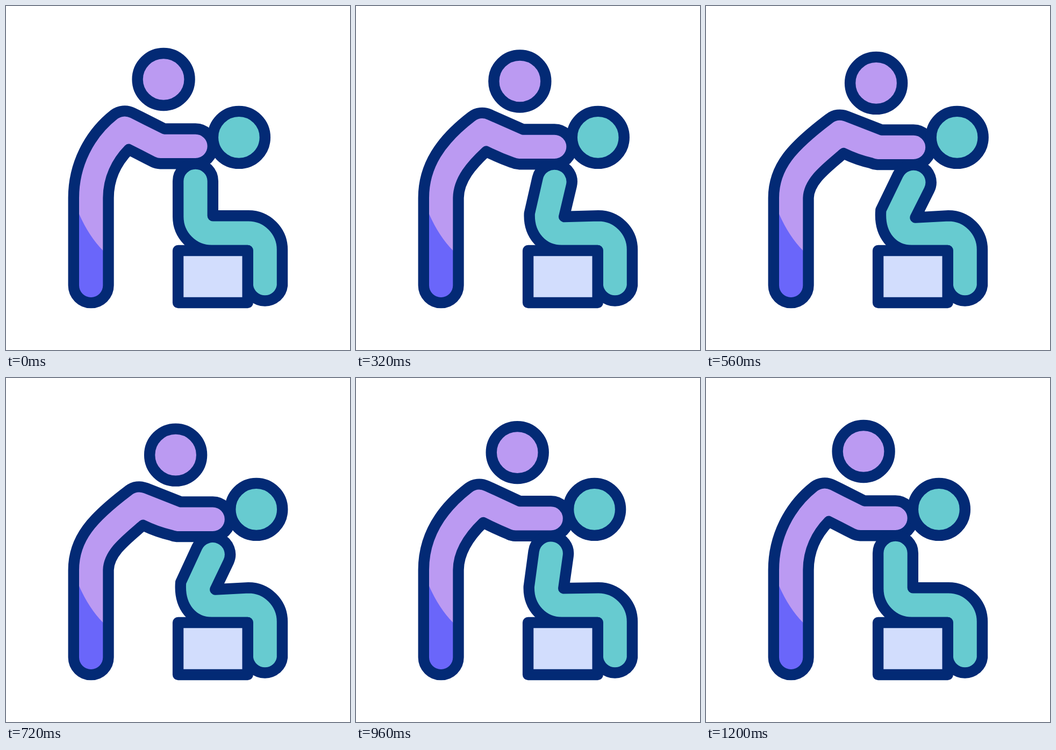
An HTML page that plays this animation: 640x640 px, repeating every 1240 ms.

```html
<!DOCTYPE html>
<html lang="en">
<head>
<meta charset="utf-8">
<title>Massage</title>
<style>
  html, body { margin: 0; width: 100%; height: 100%; overflow: hidden; background: #fff; }
  svg { display: block; width: 100vw; height: 100vh; }
  .line { stroke: #032a75; stroke-width: 20.4; stroke-linejoin: round; stroke-linecap: round; }
</style>
</head>
<body>
<svg viewBox="0 0 640 640">
  <path id="standFill" fill="#bb9af2"/>
  <path fill="#6a66fa" d="M125.8 362L136 387Q154 428 180.4 455L190.5 464V519.8A32.35 32.35 0 0 1 125.8 519.8Z"/>
  <path id="standLine" class="line" fill="none"/>
  <path id="sit" class="line" fill="#67cbd0"/>
  <rect class="line" x="320.1" y="455" width="129.6" height="97" fill="#d2ddfd"/>
  <circle id="standHead" class="line" r="48.5" fill="#bb9af2"/>
  <circle id="sitHead" class="line" r="48.5" fill="#67cbd0"/>
</svg>
<script>
const LOOP = 1240, STEP = 40, START = 28, PEAK = 616, END = 1184;
const el = id => document.getElementById(id);
const clamp = x => Math.min(1, Math.max(0, x));

// cubic-bezier(.5, 0, .5, 1)
function ease(x) {
  let lo = 0, hi = 1;
  for (let i = 0; i < 24; i++) {
    const s = (lo + hi) / 2;
    if (1.5 * s * (1 - s) + s * s * s < x) lo = s; else hi = s;
  }
  return lo * lo * (3 - 2 * lo);
}

function lean(t) {
  return t < PEAK
    ? ease(clamp((t - START) / (PEAK - START)))
    : ease(clamp((END - t) / (END - PEAK)));
}

const pair = (x, y) => `${x.toFixed(2)} ${y.toFixed(2)} `;

function standPath(p) {
  return `M125.8 519.8V357C125.8 ${(296 + 3 * p).toFixed(2)} `
    + p_(154, 239, 6, 23) + p_(201, 202, 28, 8)
    + 'C' + p_(210.5, 194.8, 28.4, 7.3) + p_(224, 193, 26.9, 7.9) + p_(236, 199, 26.4, 6.4)
    + 'L' + p_(294.8, 228.5, 32.5, 2)
    + 'L' + p_(352.5, 228.5, 34, 2)
    + 'A32.35 32.35 0 0 1 ' + p_(352.5, 293.2, 34, 2)
    + 'L' + p_(287, 293.2, 32.5, 2)
    + 'Q' + p_(280, 293, 32.5, 1.6) + p_(273.5, 290, 33.8, 2.2)
    + 'Q' + p_(251, 278.5, 30.4, 8) + p_(228.5, 267, 27.9, 7.3)
    + 'C' + p_(206, 290, 19.3, 11.2) + p_(190.5, 321, 1, 4) + '190.5 357'
    + 'V519.8A32.35 32.35 0 0 1 125.8 519.8Z';

  function p_(x, y, dx, dy) { return pair(x + dx * p, y + dy * p); }
}

function sitPath(p) {
  const at = (x, y, dx, dy) => pair(x + dx * p, y + dy * p);
  const r = 32.35, a = 26.3 * p * Math.PI / 180;
  const cx = 352.5 + 34.2 * p, cy = 325.8 + 2.2 * p;
  const ux = r * Math.cos(a), uy = r * Math.sin(a);
  return 'M' + at(320.2, 392, 5.2, -12.7)
    + 'L' + pair(cx - ux, cy - uy)
    + `A${r} ${r} 0 0 1 ` + pair(cx + ux, cy + uy)
    + 'L' + at(384.8, 390.3, 4.8, 3.4)
    + 'L451 390.3A63 63 0 0 1 514 453.3V519.8'
    + `A${r} ${r} 0 0 1 449.7 519.8V455H383`
    + 'C348.2 455 ' + at(320.2, 426.8, 1.2, 0) + at(320.2, 392, 5.2, -12.7) + 'Z';
}

function place(id, x, y) {
  el(id).setAttribute('cx', x);
  el(id).setAttribute('cy', y);
}

function draw(t) {
  const p = lean(t);
  const stand = standPath(p);
  el('standFill').setAttribute('d', stand);
  el('standLine').setAttribute('d', stand);
  el('sit').setAttribute('d', sitPath(p));
  place('standHead', 293.1 + 23.8 * p, 136.5 + 7 * p);
  place('sitHead', 433.4 + 34.2 * p, 244.4);
}

function tick() {
  const t = performance.now() % LOOP;
  draw(Math.floor(t / STEP) * STEP);
  requestAnimationFrame(tick);
}
tick();
</script>
</body>
</html>
```
